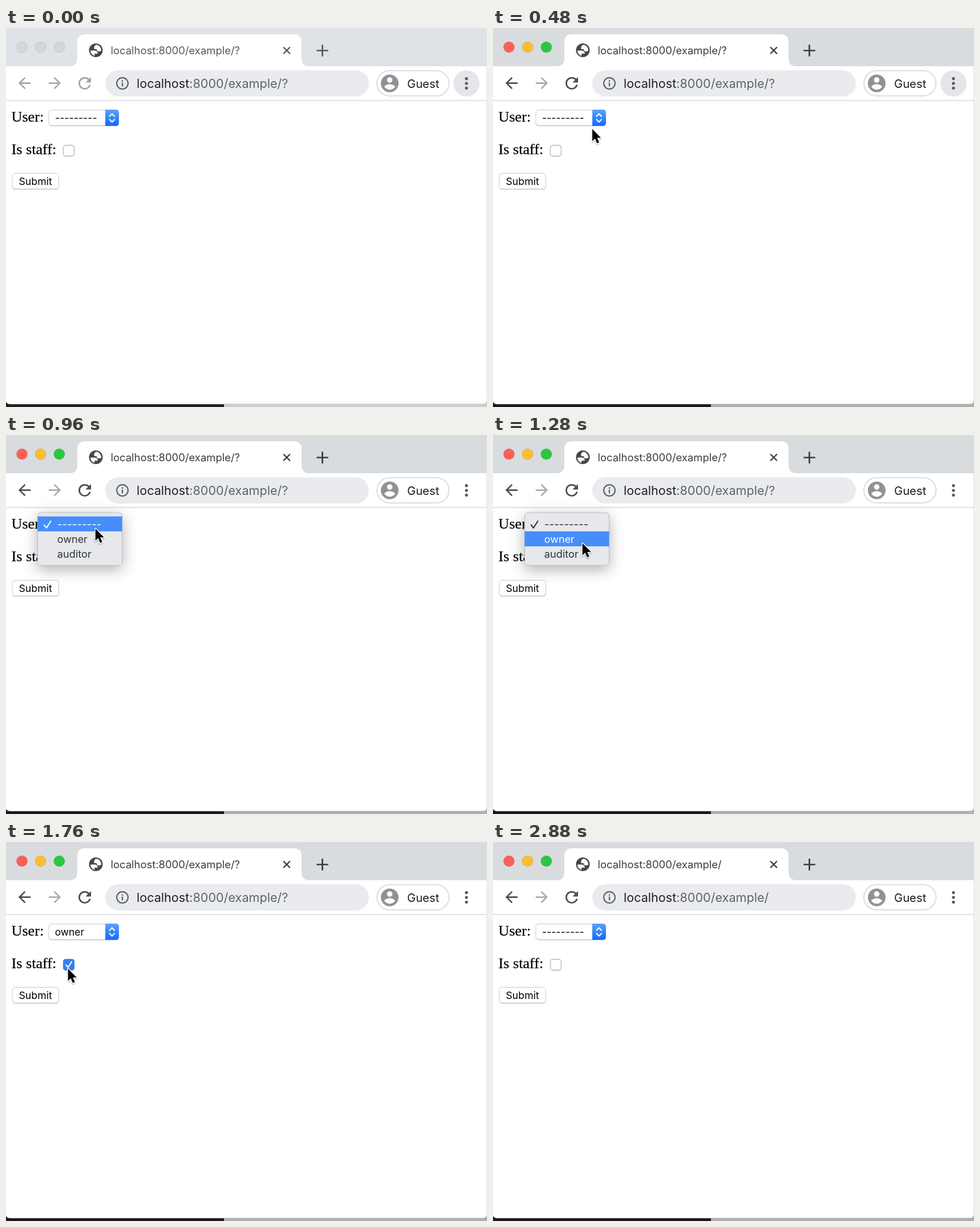
Animation of 843x664 px, one loop 3200 ms. Source, as an HTML page:

```html
<!DOCTYPE html>
<html lang="en">
<head>
<meta charset="utf-8">
<title>Form filter</title>
<style>
  html, body { margin: 0; width: 100%; height: 100%; overflow: hidden; background: #fff; }
  svg { display: block; width: 100vw; height: 100vh; }
  text { font-family: Inter, sans-serif; font-variant-ligatures: none; white-space: pre; }
  .serif { font: 26.2px "Liberation Serif", serif; stroke: #000; stroke-width: .25; }
  .line { fill: none; stroke-linecap: round; stroke-linejoin: round; }
</style>
</head>
<body>
<svg viewBox="0 0 843 664">
  <defs>
    <linearGradient id="blue" x2="0" y2="1">
      <stop stop-color="#5ba3f9"/><stop offset="1" stop-color="#1669f8"/>
    </linearGradient>
    <filter id="lift" x="-50%" y="-60%" width="200%" height="240%">
      <feDropShadow dx="0" dy="7" stdDeviation="13" flood-opacity=".3"/>
    </filter>
    <filter id="soft" x="-50%" y="-30%" width="200%" height="170%">
      <feDropShadow dx="0" dy="1.5" stdDeviation="1.2" flood-opacity=".35"/>
    </filter>
    <path id="arrow" d="M20 11H7.8l5.6-5.6L12 4l-8 8 8 8 1.4-1.4L7.8 13H20z"/>
  </defs>

  <!-- desktop edge and window -->
  <rect id="deskL" y="650" width="382" height="14"/>
  <rect id="deskR" x="382" y="650" width="461" height="14"/>
  <path d="M-2-2H843V651.500Q843 659 835.500 659H7Q0 659-1 651.500Z" fill="#fff" stroke="#a3a3a3" stroke-width=".6"/>

  <!-- tab strip -->
  <rect id="strip" width="843" height="67"/>
  <path d="M111 67Q125 67 125 53V25Q125 11 139 11H504Q518 11 518 25V53Q518 67 532 67Z" fill="#fff"/>
  <g id="lights" stroke="#000" stroke-opacity=".1">
    <circle cx="28" cy="33.5" r="9.6"/><circle cx="60.7" cy="33.5" r="9.6"/><circle cx="93.4" cy="33.5" r="9.6"/>
  </g>
  <circle cx="157.5" cy="39" r="12" fill="#44474b"/>
  <path d="M148 39.5h6.500c4.200 0 6.300 1.800 6.300 5.500h-5.600v3.800A10 10 0 0 1 148 39.500ZM159.500 29.500A10 10 0 0 1 167 39.500c-1 1.200-2.200 1.600-4 1.600-3 0-4.200-1.600-4.200-4.100h-4.300v-3c0-2.400 2-4.500 5-4.500Z" fill="#fff"/>
  <g id="tabInk">
    <text id="tab" x="183.5" y="46" font-size="18.45"></text>
    <path d="M486.2 33.500l11.600 11.600m0-11.600l-11.600 11.600" stroke="currentColor" stroke-width="2.3"/>
    <path d="M544.3 39.500h20.400m-10.200-10.200v20.400" stroke="currentColor" stroke-width="2.7"/>
  </g>

  <!-- toolbar -->
  <path d="M0 127H843" stroke="#d6d8db" stroke-width="1.7"/>
  <g id="nav">
    <use href="#arrow" transform="translate(16.5 80.6) scale(1.33)"/>
    <path transform="translate(121.6 80.4) scale(1.37)" d="M17.65 6.35A8 8 0 1 0 19.73 14h-2.080A6 6 0 1 1 16.22 7.780L13 11h7V4z"/>
  </g>
  <use href="#arrow" transform="translate(101.5 80.6) scale(-1.33 1.33)" fill="#a9abae"/>
  <rect x="174" y="74" width="462" height="46" rx="23" fill="#e9ebee"/>
  <circle cx="204" cy="97" r="9.9" fill="none" stroke="#5f6368" stroke-width="2.2"/>
  <path d="M204 95.500v6.700m0-10.700v2.400" stroke="#5f6368" stroke-width="2.3"/>
  <text x="229" y="105" font-size="21.6" fill="#5f6368"><tspan fill="#202124">localhost</tspan><tspan id="url"></tspan></text>
  <rect x="650" y="74.7" width="126.5" height="44.3" rx="22.15" fill="#fff" stroke="#dbdde1" stroke-width="2"/>
  <g transform="translate(672.5 97) scale(1.55)">
    <circle r="10" fill="#909296"/>
    <circle cy="-3.800" r="3.100" fill="#fff"/>
    <path d="M-6 4C-6 2-2 .9 0 .9S6 2 6 4A7.200 7.200 0 0 1-6 4Z" fill="#fff"/>
  </g>
  <text x="703" y="105" font-size="20.3" fill="#1c1d1f">Guest</text>
  <circle id="hover" cx="807" cy="97" r="23" fill="#e4e6e9"/>
  <g fill="#55585c"><circle cx="807" cy="88.7" r="2.6"/><circle cx="807" cy="97" r="2.6"/><circle cx="807" cy="105.3" r="2.6"/></g>

  <!-- form -->
  <text class="serif" x="9.5" y="163.6">User:</text>
  <text class="serif" x="9.5" y="221">Is staff:</text>
  <rect x="75" y="144.5" width="122.5" height="27.5" rx="5" fill="#b9b9b9"/>
  <rect x="75" y="143.5" width="122.5" height="27.5" rx="5" fill="#fff" stroke="#c9c9c9"/>
  <path d="M174 143H192.500Q198 143 198 148.500V166Q198 171.500 192.500 171.500H174Z" fill="url(#blue)"/>
  <path class="line" d="M181.500 154.700l4.300-4.500 4.300 4.500m-8.600 5.600l4.300 4.500 4.300-4.500" stroke="#fff" stroke-width="2"/>
  <rect id="ring" x="73.5" y="142" width="125.5" height="30.5" rx="6" fill="none" stroke="#82aef6" stroke-width="3.8"/>
  <text id="blank" x="86" y="164" font-size="17.8">---------</text>
  <text id="chosen" x="85.7" y="164" font-size="17.4">owner</text>
  <rect x="100.5" y="205.5" width="19" height="19" rx="4.5" fill="#fff" stroke="#b3b3b3" stroke-width="1.3"/>
  <g id="tick">
    <rect x="100" y="205" width="20" height="20" rx="4.5" fill="#3381f6"/>
    <path class="line" d="M105.300 215.500l3.500 4 6.200-9.500" stroke="#fff" stroke-width="2.2"/>
  </g>
  <rect x="11" y="255.5" width="81.5" height="27.5" rx="5" fill="#b9b9b9"/>
  <rect x="11" y="254.5" width="81.5" height="27.5" rx="5" fill="#fff" stroke="#c9c9c9"/>
  <text x="22.5" y="275.2" font-size="17.7">Submit</text>

  <!-- drop-down -->
  <g id="menu">
    <rect x="55.5" y="136" width="148" height="92.5" rx="6" fill="#e6e8eb" stroke="#b8babd" filter="url(#lift)"/>
    <rect id="bar" x="55.5" width="148" height="26.2" fill="#468efb"/>
    <g id="first">
      <path class="line" d="M66.800 157.800l4.200 5 7.600-12" stroke="currentColor" stroke-width="2.1"/>
      <text x="90" y="162.6" font-size="18.7">---------</text>
    </g>
    <text id="second" x="89.8" y="188.5" font-size="18">owner</text>
    <text x="89.8" y="215" font-size="18.2" fill="#313437">auditor</text>
  </g>

  <path id="cursor" d="M0 0V21.300L4.800 16.800 8.300 25 12 23.300 8.500 15.500 15.100 15.200Z" stroke="#fff" stroke-width="2.6" paint-order="stroke" stroke-linejoin="round" filter="url(#soft)"/>
</svg>
<script>
const LOOP = 3200, STEP = 160;
const INK = '#313437';
const $ = id => document.getElementById(id);
const show = (id, on) => $(id).setAttribute('visibility', on ? 'visible' : 'hidden');
// sets the fill, and the colour that currentColor strokes inherit
const paint = (id, c) => {
  $(id).setAttribute('fill', c);
  $(id).setAttribute('color', c);
};

// pointer tip, one entry per step; the last place is kept until it leaves
const tips = [null, [434.5, 209], [184.7, 183], [174, 177], [162, 170], [156.7, 164],
  [156.7, 164], [179, 185], [156.7, 189.5], [133, 198.5], [109, 212], [108.7, 222],
  [68, 275.5], [65.7, 273]];

function draw(ms) {
  const t = ms % LOOP;
  const within = (a, b) => t >= a && t < b;
  const active = t >= 480;

  paint('strip', active ? '#d9dcdf' : '#dfe2e7');
  paint('tabInk', active ? '#393c3f' : '#55585c');
  paint('nav', active ? '#4b4e52' : '#a3a5a8');
  paint('deskL', active ? '#1b1819' : '#231f20');
  paint('deskR', active ? '#b0b0b0' : '#cfcfcf');
  ['#fd5f57', '#febd2f', '#2ac840'].forEach((c, i) =>
    $('lights').children[i].setAttribute('fill', active ? c : '#d5d6d8'));

  const path = ':8000/example/' + (t < 2240 ? '?' : '');
  $('tab').textContent = 'localhost' + path;
  $('url').textContent = path;
  show('hover', t < 960);

  const picked = within(1440, 2240);
  show('ring', within(800, 1760));
  show('blank', !picked);
  show('chosen', picked);
  show('tick', within(1760, 2240));

  const onFirst = t < 1120;
  show('menu', within(960, 1440));
  $('bar').setAttribute('y', onFirst ? 142.6 : 168.8);
  paint('first', onFirst ? '#fff' : INK);
  paint('second', onFirst ? INK : '#fff');

  const tip = tips[Math.min(Math.floor(t / STEP), tips.length - 1)];
  show('cursor', tip && t < 2720);
  if (tip) $('cursor').setAttribute('transform', `translate(${tip})`);
}

const start = performance.now();
function tick() {
  draw(performance.now() - start);
  requestAnimationFrame(tick);
}
draw(0);
requestAnimationFrame(tick);
</script>
</body>
</html>
```
